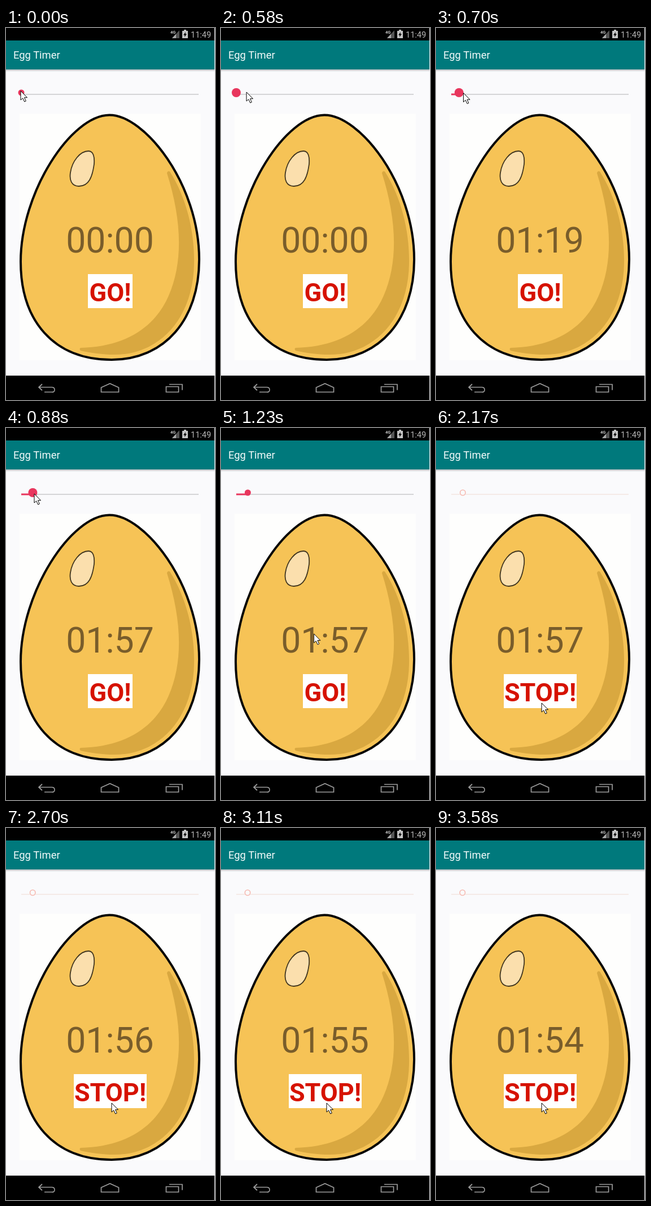
These frames come from a looping animation (370x656 px, 3.7 s). An HTML page:

```html
<!DOCTYPE html>
<html lang="en">
<head>
<meta charset="utf-8">
<title>Egg Timer</title>
<style>
  html, body { margin: 0; width: 100%; height: 100%; overflow: hidden; background: #fafafc; }
  svg { display: block; width: 370px; height: 656px; }
  text { font-family: Roboto, sans-serif; }
  .mid { text-anchor: middle; }
</style>
</head>
<body>
<svg viewBox="0 0 370 656">
  <defs>
    <linearGradient id="shadow" x2="0" y2="1">
      <stop stop-color="#b4babd"/>
      <stop offset="1" stop-color="#fafafc"/>
    </linearGradient>
  </defs>

  <rect width="370" height="656" fill="#fafafc"/>
  <rect y="73" width="369" height="4" fill="url(#shadow)"/>
  <rect width="369" height="22"/>
  <rect y="22" width="369" height="51" fill="#00797c"/>
  <text x="13" y="54" font-size="18.4" fill="#f4fafa">Egg Timer</text>

  <!-- Status icons -->
  <path d="M307 4V18H294Z" fill="#555"/>
  <path d="M301 10.5V18H294Z" fill="#aaa"/>
  <text x="291" y="10" font-size="7.5" font-weight="700" fill="#c4c4c4">4G</text>
  <path d="M312 5H315V3H319V5H322V18H312Z" fill="#c4c4c4"/>
  <path d="M318 7L314 12.5H316.5L316 16L320 10.5H317.5Z"/>
  <text x="327" y="17" font-size="14.5" fill="#b8b8b8">11:49</text>

  <!-- Egg -->
  <rect x="24" y="151" width="321" height="435" fill="#fefefd"/>
  <path d="M183 153.5C245 153 342 275 342 408C342 515 280 585 187 585C84 585 26 516 26 412C26 290 115 154 183 153.5Z"
        fill="#f6c356" stroke="#050505" stroke-width="4"/>
  <path d="M290 253C320 300 334 360 333 415C332 500 285 565 210 575C185 578 155 574 132 569Q129 566 132 564C215 562 265 525 288 472C315 410 310 335 285 256Q286 251 290 253Z"
        fill="#d9a840"/>
  <path d="M146 217C155 217 157 228 156 240C153 262 147 279 129 279C116 279 112 268 114 255C117 235 131 217 146 217Z"
        fill="#fbdfad" stroke="#40351f" stroke-width="1.8"/>
  <text id="clock" class="mid" x="184" y="396" font-size="62.5" fill="#795d2b"></text>
  <rect id="button" y="434" height="60" fill="#fff"/>
  <text id="label" class="mid" x="184.5" y="482" font-size="45" font-weight="700" fill="#d61200"></text>

  <!-- Slider -->
  <path id="track" d="M27 117H341" stroke-width="1.6"/>
  <path id="bar" stroke="#e8365d" stroke-width="3"/>
  <circle id="thumb" cy="114"/>

  <!-- Navigation bar -->
  <rect y="613" width="369" height="43"/>
  <g fill="none" stroke="#9c9c9c" stroke-width="1.7">
    <path d="M64 628L58 633.5L64 639M58 633.5H81Q86 633.5 86 638T81 642H68"/>
    <path d="M168.500 642V634L184 627L199.500 634V642Z"/>
    <path d="M283.500 632.500H305.500V642H283.500ZM289 628.500H312V638.500"/>
  </g>

  <path id="cursor" d="M0 0V16L3.700 12.700L6.700 19L9.300 17.800L6.500 11.700H11.500Z"
        fill="#fff" stroke="#000"/>
</svg>
<script>
const LOOP = 3700, STEP = 1530 / 26;
const MOVE_START = 410, MOVE_END = 1940, STARTED = 2170;

// Each row: time in ms, then values
const cursorPath = [
  [410, 26, 111], [585, 45, 113], [640, 48, 114], [880, 50, 116], [940, 50, 116],
  [1000, 60, 135], [1225, 163, 358], [1410, 193, 460], [1700, 203, 507],
  [1760, 203, 507], [1940, 187, 485]
];
const secondsPath = [[590, 0], [760, 117]];
const radiusPath = [[360, 5.5], [530, 8], [890, 8], [1060, 5.5]];
const ticks = [2700, 3110, 3580];

const el = id => document.getElementById(id);
const set = (id, attrs) => {
  for (const name in attrs) el(id).setAttribute(name, attrs[name]);
};

function sample(path, t) {
  const next = path.findIndex(row => row[0] > t);
  if (next === 0) return path[0].slice(1);
  if (next < 0) return path.at(-1).slice(1);
  const a = path[next - 1], b = path[next];
  const k = (t - a[0]) / (b[0] - a[0]);
  return a.slice(1).map((v, i) => v + (b[i + 1] - v) * k);
}

// Movement is held between screen updates
function snap(t) {
  if (t < MOVE_START) return 0;
  const n = Math.floor((Math.min(t, MOVE_END) - MOVE_START) / STEP + 0.12);
  return MOVE_START + n * STEP;
}

function render(t) {
  const held = snap(t);
  const running = t >= STARTED;
  const [x, y] = sample(cursorPath, held);
  const [radius] = sample(radiusPath, held);
  const elapsed = ticks.filter(time => t >= time).length;
  const seconds = Math.round(sample(secondsPath, held)[0]) - elapsed;
  const thumbX = 27 + 314 * seconds / 1800;
  const pad = n => String(n).padStart(2, "0");

  set("cursor", { transform: `translate(${x} ${y})` });
  el("clock").textContent = pad(Math.floor(seconds / 60)) + ":" + pad(seconds % 60);
  el("label").textContent = running ? "STOP!" : "GO!";
  set("button", running ? { x: 120, width: 129 } : { x: 145, width: 79 });
  set("track", { stroke: running ? "#f3e4e1" : "#c8c9cb" });
  set("bar", { d: `M27 117H${thumbX}`, visibility: running ? "hidden" : "visible" });
  set("thumb", {
    cx: thumbX,
    r: running ? 4.7 : radius,
    fill: running ? "#fafafc" : "#e8365d",
    stroke: running ? "#f6b9b0" : "none",
    "stroke-width": 1.6
  });
}

const start = performance.now();
function frame() {
  render((performance.now() - start) % LOOP);
  requestAnimationFrame(frame);
}
frame();
</script>
</body>
</html>
```
